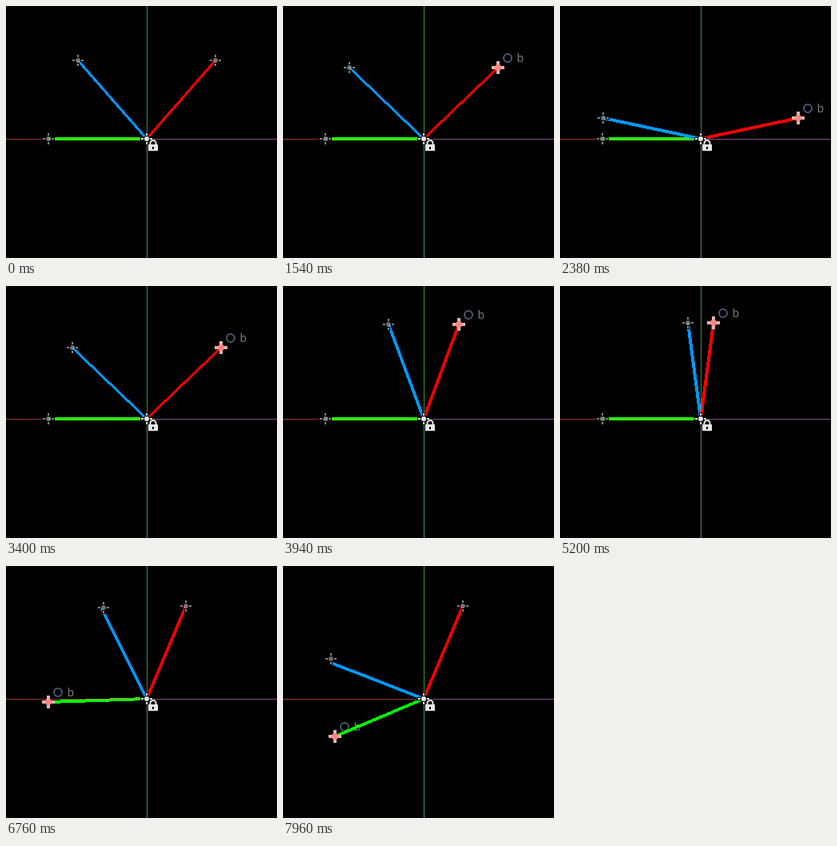
Animation, 339 px wide and 315 px high, one loop 8000 ms. Source, as an HTML page:

```html
<!DOCTYPE html>
<html lang="en">
<head>
<meta charset="utf-8">
<title>Rotating segments</title>
<style>
  html, body { margin: 0; width: 100%; height: 100%; overflow: hidden; background: #000; }
  svg { display: block; width: 339px; height: 315px; }
  .gap { stroke: #000; stroke-width: 4; }
  .idle { stroke: #858585; stroke-width: 2; }
  .hot { stroke: #dfb4ac; stroke-width: 4; }
</style>
</head>
<body>
<svg viewBox="0 0 339 315">
  <defs>
    <path id="dashes" d="M-7 0h3M4 0h3M0-7v3M0 4v3"/>
    <path id="gaps" class="gap" d="M-8 0h5M3 0h5M0-8v5M0 3v5"/>
    <g id="idle">
      <use href="#gaps"/>
      <use href="#dashes" class="idle"/>
      <circle r="3" fill="#909090" fill-opacity=".75"/>
    </g>
    <g id="hot">
      <path class="hot" d="M-8 0H8M0-8V8"/>
      <circle r="4" fill="#ff8484"/>
    </g>
  </defs>
  <rect width="339" height="315"/>
  <g id="label">
    <circle cx="12" cy="-12" r="5" fill="none" stroke="#4c5670" stroke-width="2"/>
    <text x="23.5" y="-7" font-family="'Noto Sans', sans-serif" font-size="14" fill="#7c7c7c">b</text>
  </g>
  <g shape-rendering="crispEdges">
    <line id="green" stroke="#0f0"/>
    <line id="blue" stroke="#0098ff"/>
    <line id="red" stroke="#f00"/>
    <g fill-opacity=".55">
      <rect y="166" width="176" height="1" fill="#ff6a66"/>
      <rect x="177" y="166" width="162" height="1" fill="#f486fa"/>
      <rect x="176" width="1" height="166" fill="#6dff6d"/>
      <rect x="176" y="167" width="1" height="148" fill="#86f8ff"/>
    </g>
  </g>
  <use id="greenTip"/>
  <use id="blueTip" href="#idle"/>
  <use id="redTip"/>
  <g transform="translate(176 166)">
    <use href="#gaps"/>
    <circle r="4"/>
    <use href="#dashes" stroke="#fff" stroke-width="2"/>
    <circle r="3" fill="#e8e8e8"/>
  </g>
  <rect x="178" y="173" width="12" height="8" fill="#e8e8e8"/>
  <path d="M180.5 174v-2.5a3.5 3.5 0 0 1 7 0V174" fill="none" stroke="#e8e8e8" stroke-width="2"/>
  <rect x="183" y="176" width="2" height="3"/>
</svg>
<script>
  const LOOP = 8000, STEP = 60, START = 100, LAG = 22;
  const LABEL_HOP = 6220, GRAB_GREEN = 6580;
  const OX = 176, OY = 166, TURN = 2 * Math.PI;
  const $ = id => document.getElementById(id);

  // each drag: start time, end time, where the tip ends up
  const redDrags = [
    [700, 760, 265, 72],
    [1480, 1540, 269, 77],
    [1540, 2380, 298, 140],
    [2800, 3400, 269, 77],
    [3400, 3640, 243, 55],
    [3640, 4300, 192, 46],
    [5680, 6160, 225, 50]
  ];
  const greenDrags = [
    [6700, 6760, 53, 170],
    [7480, 7960, 65, 213]
  ];

  function polar(x, y) {
    const angle = Math.atan2(OY - y, x - OX);
    return [(angle + TURN) % TURN, Math.hypot(x - OX, y - OY)];
  }

  const point = (angle, len) =>
    [OX + len * Math.cos(angle), OY - len * Math.sin(angle)];

  // angle and length of a tip that swings steadily through its drags
  function swing(home, drags, t, lag = 0) {
    let [angle, len] = polar(...home);
    for (const [from, to, x, y] of drags) {
      if (t <= from) break;
      const [a, l] = polar(x, y);
      const f = (Math.min(t, to) - lag - from) / (to - from);
      angle += (a - angle) * f;
      len += (l - len) * f;
    }
    return [angle, len];
  }

  function set(id, attrs) {
    for (const name in attrs) $(id).setAttribute(name, attrs[name]);
  }

  // the stroke keeps 4 px across the minor axis, so diagonals look thinner
  function drawSegment(id, angle, len) {
    const [x2, y2] = point(angle, len);
    const slim = Math.max(Math.abs(Math.cos(angle)), Math.abs(Math.sin(angle)));
    set(id, { x1: OX, y1: OY, x2, y2, "stroke-width": 4 * slim });
  }

  const place = (id, [x, y]) =>
    set(id, { transform: `translate(${Math.round(x)} ${Math.round(y)})` });

  const setHot = (id, hot) => set(id, { href: hot ? "#hot" : "#idle" });

  function draw(ms) {
    const t = ms < START ? 0 : START + Math.floor((ms - START) / STEP) * STEP;
    const [ra, rl] = swing([262, 68], redDrags, t);
    const [ga, gl] = swing([53, 166], greenDrags, t);
    const [late] = swing([53, 166], greenDrags, t, LAG);
    const mirror = axis => 2 * axis - ra - Math.PI;
    const red = point(ra, rl), green = point(ga, gl);

    drawSegment("red", ra, rl);
    drawSegment("green", ga, gl);
    drawSegment("blue", mirror(ga), rl);
    place("redTip", red);
    place("greenTip", green);
    place("blueTip", point(mirror(late), rl));
    place("label", t < LABEL_HOP ? red : green);

    set("label", { visibility: t < START ? "hidden" : "visible" });
    setHot("redTip", t >= START && t < GRAB_GREEN);
    setHot("greenTip", t >= GRAB_GREEN);
  }

  const begin = performance.now();
  function tick() {
    draw((performance.now() - begin) % LOOP);
    requestAnimationFrame(tick);
  }
  draw(0);
  requestAnimationFrame(tick);
</script>
</body>
</html>
```
